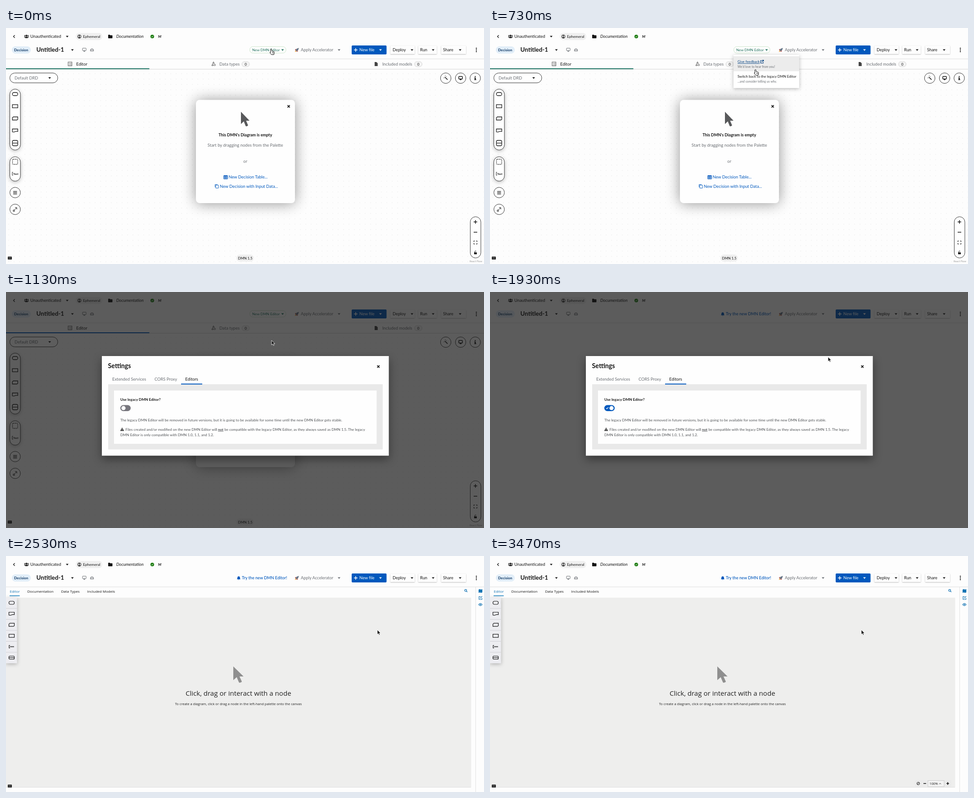
Write an HTML page that moves like this. It is 1062 px wide and 527 px high and loops after 3.54 s.

```html
<!DOCTYPE html>
<html lang="en">
<head>
<meta charset="utf-8">
<title>DMN editor settings</title>
<style>
html, body { margin: 0; width: 100%; height: 100%; overflow: hidden; background: #fdfdfd }
svg { display: block; width: 1062px; height: 527px; font: 9.3px Lato, sans-serif; fill: #151515 }
.line { fill: none; stroke: #151515 }
.box { fill: #fff; stroke: #333 }
.gray { fill: #6a6e73 }
.blue { fill: #0058bd }
.green { fill: #22705f }
.small { font-size: 8.04px }
.bold { font-weight: 700 }
.mid { text-anchor: middle }
.open { font-family: "Open Sans", sans-serif }
.soft { filter: drop-shadow(0 1px 1.2px #0004) }
.float { filter: drop-shadow(0 2px 4px #0004) }
</style>
</head>
<body>
<svg viewBox="0 0 1062 527">
<defs>
  <pattern id="dots" width="12" height="12" patternUnits="userSpaceOnUse"><circle cx="6" cy="6" r=".5" fill="#ccc"/></pattern>
  <path id="caret" d="M-3-1.5H3L0 2Z"/>
  <path id="plus" d="M-4 0H4M0-4V4" stroke-width="1.5"/>
  <path id="minus" d="M-4 0H4" stroke-width="1.5"/>
  <path id="close" d="M-2.6-2.6L2.6 2.6M2.6-2.6L-2.6 2.6" stroke="#151515" stroke-width="1.7"/>
  <path id="pointer" d="M0 0V27.5L6.3 21.5 10.3 31.5Q11 33 12.5 32.4L15 31.4Q16 30.8 15.5 29.5L11.5 20H19Z"/>
  <rect id="oval" x="-6" y="-3.5" width="12" height="7" rx="3.5"/>
  <rect id="rect" x="-6" y="-3.5" width="12" height="7"/>
  <path id="clip" d="M-4-3.5H6V2L4 3.5H-6V-1.5Z"/>
  <path id="doc" d="M-6-3.5H6V2Q3 1 0 2.5T-6 3Z"/>
  <g id="service"><rect x="-6" y="-6" width="12" height="12" rx="3"/><path d="M-6 0H6"/></g>
  <g id="screen"><rect x="-4" y="-3.5" width="8" height="5.5" rx=".8"/><path d="M-2 3.8H2M0 2V4"/></g>
  <g id="keyboard"><rect x="4" y="510.500" width="9" height="6.500" rx="1"/><path d="M5.500 512.500h6M5.500 515h6" stroke="#fff" stroke-width=".8" stroke-dasharray="1 .7"/></g>
</defs>

<rect width="1062" height="527" fill="#fdfdfd"/>

<g id="header">
  <path class="line" d="M19.500 16l-3 3 3 3" stroke-width="1.300"/>
  <circle cx="45.500" cy="17" r="1.900"/><circle cx="42" cy="17" r="1.200"/><circle cx="49" cy="17" r="1.200"/>
  <path d="M42.500 22.500v-1.500q0-1.500 1.500-1.500h3q1.500 0 1.500 1.500v1.500zM40.500 21v-1q0-1 1-1h1.500l-1 2zM50.500 21v-1q0-1-1-1h-1.500l1 2z"/>
  <text x="54" y="22.300">Unauthenticated</text>
  <use href="#caret" x="136" y="19"/>
  <rect x="155" y="11" width="59" height="16" rx="8" fill="#f0f0f0"/>
  <circle class="line" cx="163" cy="19" r="3.800"/><circle cx="163" cy="17.800" r="1.400"/><path d="M160.500 21.500q2.500-3 5 0l-2.500 1.300z"/>
  <text x="171" y="22" font-size="8.300">Ephemeral</text>
  <path d="M227 16q0-1 1-1h2.500l1.200 1.300h3.800q1 0 1 1v4.700q0 1-1 1h-7.500q-1 0-1-1z"/>
  <text x="245" y="22.300" font-style="italic" font-size="9.400">Documentation</text>
  <circle cx="325" cy="19" r="4.100" fill="#1e7d12"/><path d="M323 19l1.500 1.500 2.600-2.900" fill="none" stroke="#fff"/>
  <text x="338" y="22" font-size="8" font-style="italic" font-weight="700">M</text>

  <rect x="13" y="41" width="42" height="16" rx="8" fill="#e2eef8"/>
  <text x="18" y="52" class="bold" font-size="8.100" fill="#0b3562">Decision</text>
  <text x="67.500" y="53.300" class="bold" font-size="13.400">Untitled-1</text>
  <use href="#caret" x="147.500" y="49"/>
  <g class="line" style="stroke:#6a6e73"><use href="#screen" x="174" y="48.500"/><path d="M187.500 49l1.500-2.500h4l1.500 2.500v2.500h-7zh7"/></g>
  <g transform="translate(646.500 48.800) rotate(45)">
    <path d="M-1.500 3H1.500L0 6.500Z" fill="#f39a23"/><path d="M-3.300 3V.5L0-2 3.300.5V3Z" fill="#b93a35"/>
    <path d="M-2 3Q-2.700-3 0-6 2.700-3 2 3Z" fill="#77838f"/><circle cy="-1.500" r="1" fill="#3b5a80"/>
  </g>
  <text x="655" y="52.200" class="gray">Apply Accelerator</text>
  <use href="#caret" x="740" y="49" class="gray"/>
  <rect x="768" y="39" width="77.500" height="20" rx="2" class="blue"/>
  <g fill="#fff"><use href="#plus" x="777" y="49" stroke="#fff"/><text x="785" y="52.200">New file</text><use href="#caret" x="832" y="49"/></g>
  <g class="soft" fill="#fdfdfd"><rect x="854" y="39.500" width="54" height="18.500"/><rect x="916" y="39.500" width="41" height="18.500"/><rect x="967" y="39.500" width="55" height="18.500"/></g>
  <text x="859" y="52.200">Deploy</text><use href="#caret" x="902" y="49"/>
  <text x="920" y="52.200">Run</text><use href="#caret" x="949" y="49"/>
  <text x="971" y="52.200">Share</text><use href="#caret" x="1009" y="49"/>
  <circle cx="1045" cy="45.300" r="1.200"/><circle cx="1045" cy="49" r="1.200"/><circle cx="1045" cy="52.700" r="1.200"/>
  <path d="M0 69H1062" stroke="#dedede"/>
</g>

<g id="modern">
  <rect y="93" width="1062" height="434" fill="url(#dots)"/>
  <rect x="541.500" y="41.500" width="80.500" height="14.500" rx="7" fill="#fdfefd" stroke="#cfe6cd"/>
  <g class="green"><text x="547" y="52" font-size="8">New DMN Editor</text><use href="#caret" x="614.500" y="49"/></g>
  <path d="M0 92H1062" stroke="#d2d2d2"/>
  <rect id="tabLine" y="90" width="318.500" height="2"/>
  <g class="line" stroke-width=".9" style="stroke:#444"><rect x="138" y="76" width="8.500" height="8.500"/><path d="M140 78.500h1.500m1.500 0h2M140 80.500h1.500m1.500 0h2M140 82.500h1.500m1.500 0h2"/>
    <path d="M461 75.500l2 3.500h-4zM457 84l1.800-3.500 2 3.500z"/><circle cx="463.800" cy="82.500" r="1.700"/></g>
  <path d="M819 76h4l2.800 2.700V85H819z" fill="#444"/>
  <text x="156" y="83.600">Editor</text>
  <g class="gray"><text x="474" y="83.600" font-size="9.500">Data types</text><text x="836" y="83.600">Included models</text></g>
  <g fill="#f3f3f3" stroke="#d8d8d8"><rect x="524" y="75" width="17" height="11.500" rx="5.700"/><rect x="907.500" y="75" width="17" height="11.500" rx="5.700"/></g>
  <g class="mid" font-size="8"><text x="532.500" y="83.600">0</text><text x="916" y="83.600">0</text></g>

  <rect class="box" x="8.500" y="100.500" width="106.500" height="22" rx="11"/>
  <text x="19" y="114.500" class="gray" font-size="9.200">Default DRD</text><use href="#caret" x="97" y="111.500"/>
  <g class="float"><rect class="box" x="8.500" y="136.500" width="23.500" height="136" rx="11.700"/><rect class="box" x="8.500" y="287.500" width="23.500" height="54.500" rx="11.700"/></g>
  <g class="line" stroke-width="1.300">
    <use href="#oval" x="20.200" y="147.500"/><use href="#rect" x="20.200" y="174.700"/><use href="#clip" x="20.200" y="202"/><use href="#doc" x="20.200" y="229"/><use href="#service" x="20.200" y="257"/>
    <rect x="14.500" y="293" width="11.500" height="11.500" rx="2" stroke-dasharray="2 1.500"/>
    <path d="M15.500 322H14v7h1.500" stroke-width="1"/>
  </g>
  <text x="16" y="328" font-size="6" class="bold">Text</text>
  <g class="box"><circle cx="20.300" cy="367.500" r="11.700"/><circle cx="20.300" cy="405" r="11.700"/><circle cx="977" cy="112" r="11.700"/><circle cx="1010" cy="112" r="11.700"/><circle cx="1042.500" cy="112" r="11.700"/><rect x="1031.500" y="421.500" width="23.500" height="92" rx="11.700"/></g>
  <path class="line" d="M16 364.800h8.500M16 367.700h8.500M16 370.600h8.500" stroke-width="1.300"/>
  <path class="line" d="M16 406.500h3v3h-3zM19 406l4.500-4.500M20 401h4v4"/>
  <path class="line" d="M975 109.500l6 6" stroke-width="1.700"/><path class="line" d="M973 108l.1.100M976 106v1.500M972.500 111.500h1.500M979 108l-1 1" stroke-width=".9"/>
  <g class="line" stroke-width="1.500"><use href="#screen" x="1010" y="111.700"/></g>
  <path d="M1041.300 107.500h2.400v2h-2.400zM1040.500 110.800h3.200v4h1v1.500h-4.300v-1.500h1v-2.500h-.9z"/>
  <g class="line"><use href="#plus" x="1043" y="433"/><use href="#minus" x="1043" y="456"/><path d="M1039.500 477.500v-2h2M1044.500 475.500h2v2M1046.500 480.500v2h-2M1041.500 482.500h-2v-2" stroke-width="1.200"/><path d="M1041.300 501v-1.500a1.800 1.800 0 0 1 3.500-.3"/></g>
  <rect x="1040" y="501" width="6" height="4.300" rx=".6"/>

  <rect x="422" y="162" width="220" height="230" rx="9" fill="#000" opacity=".42" style="filter:blur(16px)"/>
  <rect x="422" y="160.500" width="220" height="230.500" rx="8" fill="#fefefe"/>
  <use href="#close" x="628" y="175"/>
  <use href="#pointer" x="522" y="187" fill="#58595b"/>
  <g class="mid">
    <text x="531.700" y="242.200" class="bold" font-size="9">This DMN's Diagram is empty</text>
    <text x="531.700" y="265" class="gray" font-size="9.500">Start by dragging nodes from the Palette</text>
    <text x="531.700" y="301" class="gray">or</text>
  </g>
  <g class="blue"><path fill-rule="evenodd" d="M483.500 329h9v8.500h-9zM485 331.500v1.500h2.500v-1.500zM488.700 331.500v1.500h2.500v-1.500zM485 334.500v1.500h2.500v-1.500zM488.700 334.500v1.500h2.500v-1.500z"/>
    <text x="494.500" y="336.300">New Decision Table...</text><text x="475" y="357.300">New Decision with Input Data...</text></g>
  <path d="M466 351h6v6.500h-6zM470 349.500h-5.500v6" fill="none" stroke="#0058bd" stroke-width=".9"/>
  <rect x="512" y="506" width="38.500" height="15.500" rx="7.700" fill="#efefef"/>
  <text x="531.500" y="516.500" class="mid" font-size="7.800">DMN 1.5</text>
  <text x="1030" y="523" font-size="5.800" fill="#999">React Flow</text>
  <use href="#keyboard"/>
</g>

<g id="menu">
  <rect class="float" x="541" y="60" width="146" height="74" fill="#fff"/>
  <rect id="hover" x="541" y="63" width="146" height="33.500" fill="#ececec"/>
  <text x="550" y="78" font-size="7.900" fill="#004080" text-decoration="underline">Give feedback</text>
  <path d="M604 72.500h-2.500v6h5.500v-2.500M604 75.500l3.500-3.500M605 71.800h2.700v2.700" fill="none" stroke="#004080" stroke-width="1.200"/>
  <text x="550" y="111" font-size="7.800">Switch back to the legacy DMN Editor</text>
  <g class="gray" font-size="6.850"><text x="550" y="89">We'd love to hear from you!</text><text x="550" y="122">...and consider telling us why.</text></g>
</g>

<g id="tryNew" class="blue">
  <path d="M513 52q1.200-1 1.200-3.500 0-2.800 2.800-3.300 2.800.5 2.800 3.300 0 2.500 1.200 3.500zM515.900 52.700h2.200q-1.100 1.800-2.200 0z"/>
  <text x="524" y="52.200" font-size="9.100" font-weight="500">Try the new DMN Editor!</text>
</g>

<g id="legacy">
  <rect y="93" width="1033.500" height="423.500" fill="#eeeeed"/>
  <path d="M1043.500 69V527M0 516.500H1033" stroke="#e0e0e0"/>
  <g class="open" font-size="8">
    <text x="8.500" y="82" fill="#1474b4">Editor</text><text x="47.500" y="82">Documentation</text><text x="122.500" y="82">Data Types</text><text x="180.500" y="82">Included Models</text>
  </g>
  <rect x="8" y="88" width="22.500" height="1.500" fill="#1480c0"/>
  <g fill="none" stroke="#1474b4" stroke-width="1.200">
    <circle cx="1021.300" cy="76.800" r="2.200"/><path d="M1023 78.500l2 2"/>
    <path d="M1055 90.500h-4v6.500h6.500v-3M1053.500 94.500l4.500-4.700"/>
    <path d="M1050 108.500q4-5.500 8 0-4 5.500-8 0z"/><circle cx="1054" cy="108.500" r="1"/>
  </g>
  <path d="M1050 75l2.500-1 3 1 2.800-1v7.200l-2.800 1-3-1-2.500 1z" fill="#1474b4"/>
  <rect class="float" y="92.500" width="24.500" height="147" fill="#ededf1"/>
  <path d="M0 117H24.500M0 141.500H24.500M0 166H24.500M0 190.500H24.500M0 215H24.500" stroke="#cfcfd4"/>
  <g class="line" stroke-width="1.200">
    <use href="#oval" x="12.500" y="104.500"/><use href="#doc" x="12.500" y="129"/><use href="#clip" x="12.500" y="153.700"/><use href="#rect" x="12.500" y="178.200"/>
    <path d="M9 199.500H7v6h2"/><path d="M9 202.500h9" stroke-width="2" stroke-dasharray="1.500 .6"/>
    <rect x="6.500" y="223.500" width="12" height="7" rx="2"/><path d="M6.500 227h12"/>
  </g>
  <use href="#pointer" transform="translate(505 246.500) scale(1.200 1.120)" fill="#8f8f8f"/>
  <g class="open mid" fill="#222"><text x="516.300" y="311.500" font-size="15.100">Click, drag or interact with a node</text><text x="516.300" y="333" font-size="7.550">To create a diagram, click or drag a node in the left-hand palette onto the canvas</text></g>
  <use href="#keyboard"/>
</g>

<g id="zoom">
  <rect x="944" y="500.500" width="81" height="15.500" fill="#ebebeb"/>
  <rect x="973" y="501.500" width="36" height="13.500" fill="#f3f3f3" stroke="#ccc"/>
  <circle class="line" cx="951.500" cy="508" r="3"/><path class="line" d="M949.500 510l4-4"/>
  <path class="line" d="M963 508h6M1014 508h6M1017 505v6" stroke-width="1.700"/>
  <text x="976.500" y="511" class="open" font-size="7.300">100%</text><path class="line" d="M998 509.500l2-2 2 2" stroke-width=".9"/>
</g>

<g id="settings">
  <rect width="1062" height="527" opacity=".69"/>
  <rect x="213" y="143" width="637.500" height="222.500" fill="#fefefe" style="filter:drop-shadow(0 8px 10px #0006)"/>
  <text x="226.500" y="170" class="bold" font-size="14.300">Settings</text>
  <use href="#close" x="827.300" y="166.500"/>
  <g class="gray"><text x="236" y="198" font-size="9.400">Extended Services</text><text x="330" y="198">CORS Proxy</text></g>
  <text x="398.300" y="198">Editors</text>
  <rect x="227" y="206" width="610" height="145.500" fill="#e9e9e9"/>
  <rect x="389" y="204.500" width="47" height="2" class="blue"/>
  <rect x="240" y="220" width="583.500" height="119" fill="#fefefe"/>
  <text x="254" y="243.300" class="bold" font-size="8.250">Use legacy DMN Editor?</text>
  <rect id="track" x="254" y="252.500" width="23" height="13.500" rx="6.750"/>
  <path id="check" d="M258 259.300l1.700 1.700 3.300-3.500" fill="none" stroke="#fff" stroke-width="1.200"/>
  <circle id="knob" cy="259.200" r="4.600" fill="#fff"/>
  <g class="small" fill="#4f5255">
    <text x="254" y="288.500">The legacy DMN Editor will be removed in future versions, but it is going to be available for some time until the new DMN Editor gets stable.</text>
    <text x="265.500" y="309.700">Files created and/or modified on the new DMN Editor will <tspan font-weight="700" text-decoration="underline">not</tspan> be compatible with the legacy DMN Editor, as they always saved as DMN 1.5. The legacy</text>
    <text x="254" y="321.500">DMN Editor is only compatible with DMN 1.0, 1.1, and 1.2.</text>
  </g>
  <path d="M258 302.500l4.300 7.700h-8.600z" fill="#333"/><path d="M258 305v2.500m0 .7v1" stroke="#fff"/>
</g>

<g id="cursor">
  <circle id="ring" r="21.700" fill="#fff" fill-opacity=".25" stroke="#111" stroke-width="1.300"/>
  <path id="arrow" d="M0 0V10.200L2.400 8 4 11.600 5.800 10.800 4.200 7.400H7.400Z" stroke="#fff" stroke-width=".8"/>
  <path id="hand" d="M-1.300 8V.7Q0-.9 1.300.7V4.500L6 5.500Q7.300 6 7 7.500L6.200 12.500H.8L-2.600 8.200Q-3 6.600-1.300 7.500ZM3 7v2.500M5 7.300v2.200" fill="#fff" stroke="#111"/>
</g>
</svg>

<script>
const LOOP = 3540, PRESS = 130;
const MENU = 400, SETTINGS = 1130, TOGGLE = 1470, LOADED = 2330, CLOSED = 2530, ZOOM = 3000;
// each click marker ends as its effect appears
const clicks = [MENU, SETTINGS, TOGGLE, CLOSED];
// time, x, y of the pointer tip
const path = [
  [0, 589, 47], [MENU, 589, 47], [890, 590, 108], [SETTINGS, 590, 108],
  [1370, 265, 258], [1540, 265, 258], [1930, 751, 145], [2200, 825, 165], [LOOP, 825, 165]
];
const $ = id => document.getElementById(id);
const show = (id, on) => $(id).style.display = on ? '' : 'none';
const within = (t, from, to) => t >= from && t < to;

function pointerAt(t) {
  const i = path.findIndex(p => p[0] > t);
  const [t0, x0, y0] = path[i - 1], [t1, x1, y1] = path[i];
  const p = (t - t0) / (t1 - t0), ease = p * p * (3 - 2 * p);
  return [x0 + (x1 - x0) * ease, y0 + (y1 - y0) * ease];
}

function draw(t) {
  const [x, y] = pointerAt(t);
  const legacy = t >= TOGGLE;
  const pointing = t < SETTINGS || within(t, 1340, 1590) || within(t, 2150, CLOSED);

  show('modern', !legacy);
  show('tryNew', legacy);
  show('menu', within(t, MENU, SETTINGS));
  show('settings', within(t, SETTINGS, CLOSED));
  show('legacy', t >= LOADED);
  show('zoom', t >= ZOOM);
  $('tabLine').setAttribute('fill', t < SETTINGS ? '#1f7565' : '#0058bd');
  $('hover').setAttribute('y', y < 97 ? 63 : 96.5);

  show('check', legacy);
  $('track').setAttribute('fill', legacy ? '#0058bd' : '#77767d');
  $('knob').setAttribute('cx', legacy ? 270 : 261);

  $('cursor').setAttribute('transform', `translate(${x} ${y})`);
  show('hand', pointing);
  show('arrow', !pointing);
  show('ring', clicks.some(c => within(t, c - PRESS, c)));
}

function tick() {
  draw(performance.now() % LOOP);
  requestAnimationFrame(tick);
}
tick();
</script>
</body>
</html>
```
